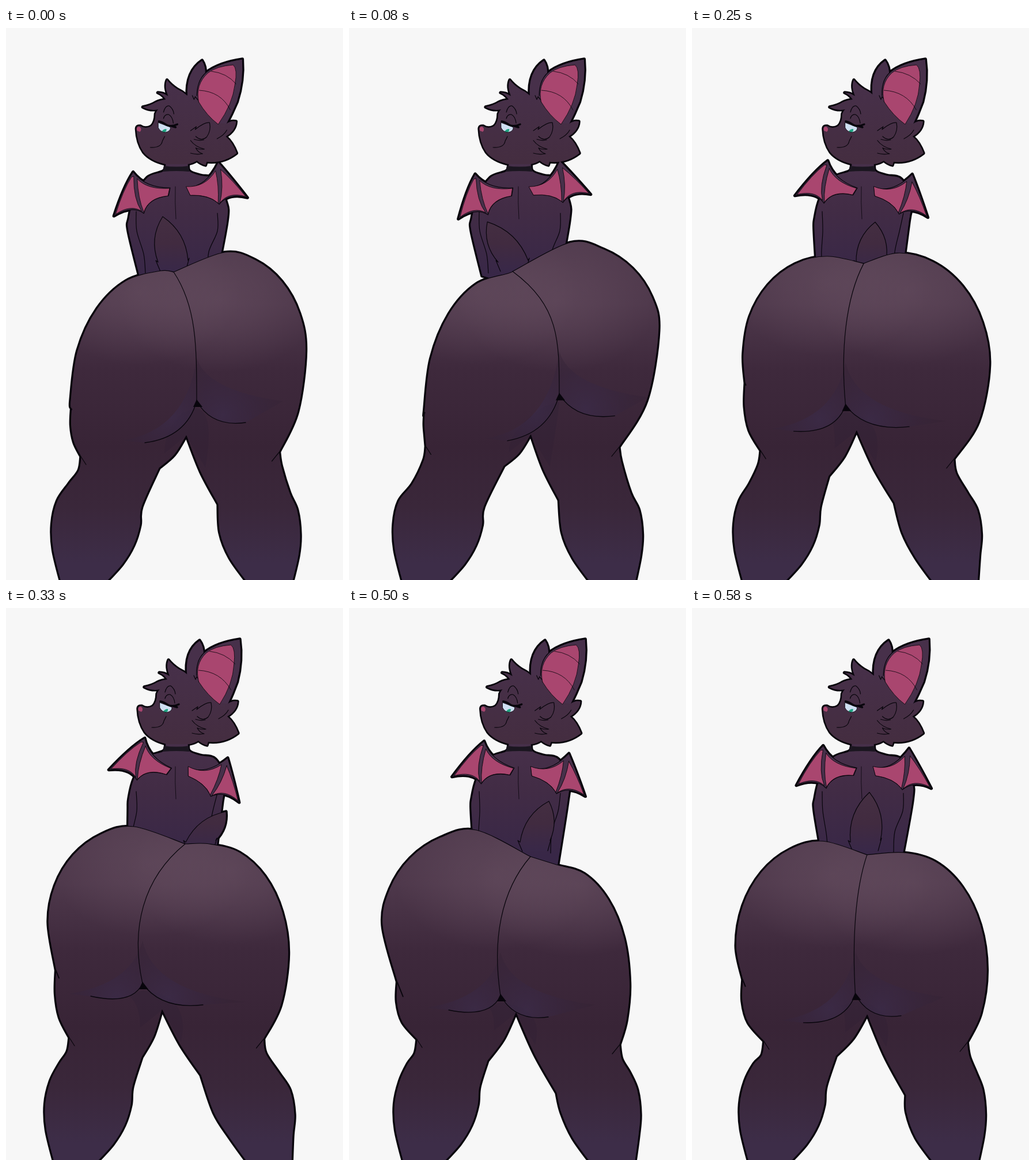
Animation, 585 px wide and 957 px high, one loop 660 ms. Source, as an HTML page with a canvas:

```html
<!DOCTYPE html>
<html lang="en">
<head>
<meta charset="utf-8">
<title>Bat sway</title>
<style>
html, body { margin: 0; width: 100%; height: 100%; overflow: hidden; background: #f7f7f7; }
canvas { display: block; }
</style>
</head>
<body>
<canvas id="stage" width="585" height="957"></canvas>
<script>
const ctx = document.getElementById('stage').getContext('2d');
const INK = '#08050c', FUR = '#47304a', PINK = '#a9466f';
const LOOP = 660, STARTS = [0, 80, 160, 250, 330, 410, 500, 580];

// Every moving part swings on a short sum of waves of the loop angle.
function poseAt(angle) {
  const wave = (mean, cos = 0, sin = 0, cos2 = 0, sin2 = 0, cos4 = 0) =>
    mean + cos * Math.cos(angle) + sin * Math.sin(angle) + cos2 * Math.cos(2 * angle)
    + sin2 * Math.sin(2 * angle) + cos4 * Math.cos(4 * angle);
  const cleft = [wave(301, -10, -14), wave(420, 7, -7, -4, 2)];
  const gap = [wave(291, 47, 35, -7, 16), wave(654, -2, -13, -5, -8)];
  const tailX = wave(284, -24, -17, 4, 4), underY = gap[1] + wave(47, 25, 22);
  return {
    cleft, gap,
    headShift: wave(1.7, -1.3, -1), earLean: wave(-3.5, 3.5, -1),
    wingTilt: wave(12, -12.5, -6, 0, -2.5),
    armEnd: wave(221, 10, 4), armRight: wave(380, 4),
    tail: [[tailX, 406], [wave(313, -55, -48, 14), wave(337, -13, -1, 3, 9)], [tailX + 52, 403]],
    topL: [Math.min(wave(247, 23, 28, -2, 16), cleft[0] - 8), wave(400, 21, 15)],
    sideL: [wave(89.5, 19.5, 28.5, 3, 7), wave(590, 50, 35, 5, 15)],
    thighL: [wave(100, 13.5, 16.5, 0, 10), wave(644, 16, -4, 0, 14)],
    topR: [wave(366, 13, 6, 0, 4), wave(405, -10, -34, -6, -2)],
    sideR: [wave(510, 15, 18, 0, 0, -4.5), wave(590, -20, -50, -10, -16)],
    kneeL: [wave(122, 10, 6, -2), wave(739, -1, -14, 5, -3)],
    kneeR: [wave(464, 13.5, -3, -3, -2.5), wave(744, -6, -10, -3, -6)],
    innerL: [wave(249, 15, 6, 2, 5), wave(774, -8, -8, -3, -3)],
    innerR: [wave(357, 15, 1, -4, -4), wave(826, 8, -7, -8, -8)],
    crotch: [wave(295, 21, 8, -3), wave(702, 5)],
    calfL: wave(75.5, 6, -1, -2, -2), calfR: wave(506, 5), calfInner: wave(228, 8, 1),
    folds: [
      { dir: -1, bend: .2, end: [gap[0] - 90, underY], tip: [gap[0] - 128, underY - 4] },
      { dir: 1, bend: .31, end: [gap[0] + wave(95, -10, 12), gap[1] + 37],
        tip: [gap[0] + wave(165, -15), gap[1] + wave(16, -16)] }
    ]
  };
}
const poses = STARTS.map((_, i) => poseAt(i * Math.PI / 4));

const mix = (a, b, t) => a + (b - a) * t;

// Appends a smooth curve through the points.
function spline(path, pts, start) {
  if (start) path.moveTo(...pts[0]); else path.lineTo(...pts[0]);
  for (let i = 0; i < pts.length - 1; i++) {
    const a = pts[i - 1] || pts[i], b = pts[i], c = pts[i + 1], d = pts[i + 2] || c;
    path.bezierCurveTo(b[0] + (c[0] - a[0]) / 6, b[1] + (c[1] - a[1]) / 6,
      c[0] - (d[0] - b[0]) / 6, c[1] - (d[1] - b[1]) / 6, c[0], c[1]);
  }
  return path;
}
const curve = pts => spline(new Path2D(), pts, true);

// Points of a quarter ellipse from its top to its side.
const quarter = (top, side) => [0, 1, 2, 3, 4].map(i => {
  const a = i * Math.PI / 8;
  return [mix(top[0], side[0], Math.sin(a)), mix(side[1], top[1], Math.cos(a))];
});

function bulge(path, a, b, k) {
  path.quadraticCurveTo((a[0] + b[0]) / 2 + (b[1] - a[1]) * k, (a[1] + b[1]) / 2 - (b[0] - a[0]) * k, ...b);
}

function withStops(g, stops) {
  for (const [at, color] of stops) g.addColorStop(at, color);
  return g;
}
const vertical = (y0, y1, stops) => withStops(ctx.createLinearGradient(0, y0, 0, y1), stops);

function line(path, width = 1.2, color = INK) {
  ctx.lineWidth = width;
  ctx.strokeStyle = color;
  ctx.stroke(path);
}
function fill(path, color) { ctx.fillStyle = color; ctx.fill(path); }

const headShape = new Path2D(`M226 175Q226 169 233 170Q242 176 252 170Q259 163 259 149Q262 142 264 141
  Q250 144 237 137Q251 134 259 129Q267 125 277 124Q272 116 263 112Q272 112 281 118Q274 101 279 90
  Q286 99 297 106Q306 110 314 117L334 118L368 164L382 166Q390 160 399 162Q398 178 381 188
  Q393 198 400 217Q377 235 348 232L346 238Q338 236 331 230Q323 235 315 236L276 236Q250 230 238 215Q227 199 226 175Z`);
const backEar = new Path2D('M314 120Q311 75 340 56Q347 66 346 82L340 124Z');
const bigEar = new Path2D('M331 126Q329 92 347 77Q369 60 410 54Q413 91 401 128Q392 149 382 168L366 182Z');
const innerEar = new Path2D('M334 128Q328 98 350 78Q365 66 394 64Q402 71 397 98Q393 132 368 167Q348 152 334 128Z');
const earFolds = new Path2D('M356 75Q383 78 399 97M335 108Q373 110 389 142');
const headLines = new Path2D(`M320 178L330 171L328 176Q344 163 353 164Q356 178 348 189Q339 197 329 188
  M326 193Q335 196 343 194M320 195Q328 206 344 210Q335 211 329 208Q333 216 341 218Q330 220 320 217
  M273 146Q276 134 283 135Q290 140 291 149M273 157Q275 149 282 150Q289 154 290 165
  M250 207Q269 208 271 196L275 188M323 117L326 124L328 119L333 125M366 192Q378 186 383 177`);
const eye = new Path2D('M264 164L285 172Q286 179 276 181Q267 180 264 173Z');
const iris = new Path2D('M270 180Q272 175 278 175Q279 179 275 181Z');
const lashes = new Path2D('M265 162Q271 163 278 168Q286 172 297 167M287 170L294 172');

const wingL = {
  root: [285, 283],
  outline: new Path2D('M285 277Q242 277 221 249Q204 274 187 325Q219 306 239 321Q245 295 282 291Z'),
  panels: new Path2D('M218 258Q203 281 190 322Q216 305 235 317Q221 296 222 257ZM228 261Q245 280 284 278L281 291Q247 294 239 319Q229 295 228 261Z')
};
const wingR = {
  root: [315, 283],
  outline: new Path2D('M314 276Q347 277 369 233Q390 257 419 295Q387 286 370 306Q353 289 320 290Z'),
  panels: new Path2D('M313 275Q346 277 364 248Q370 273 368 304Q352 289 320 290ZM373 246Q394 265 416 293Q386 284 371 304Q378 277 373 246Z')
};

function onWings(p, draw) {
  for (const wing of [wingL, wingR]) {
    const [x, y] = wing.root;
    ctx.save();
    ctx.translate(x, y);
    ctx.rotate(p.wingTilt * Math.PI / 180);
    ctx.translate(-x, -y);
    draw(wing);
    ctx.restore();
  }
}

// Runs a drawing with the head's shift and, for ears, a lean about their base.
function onHead(p, lean, draw) {
  ctx.save();
  ctx.translate(p.headShift, 0);
  if (lean) {
    const k = p.earLean / 113;
    ctx.transform(1, 0, -k, 1, 167 * k, 0);
  }
  draw();
  ctx.restore();
}

function torsoPath(p) {
  const path = curve([[276, 228], [274, 247], [245, 259], [222, 295], [213, 330], [212, 352], [p.armEnd, 430]]);
  path.lineTo(300, 450);
  return spline(path, [[362, 450], [p.armRight, 335], [382, 300], [364, 262], [337, 255], [318, 247], [317, 228]]);
}

function tailPath({ tail: [a, tip, b] }) {
  const path = new Path2D();
  path.moveTo(a[0] + 4, a[1] + 16);
  path.lineTo(a[0] - 4, a[1] - 3);
  path.lineTo(...a);
  bulge(path, a, tip, .25);
  bulge(path, tip, b, .24);
  path.lineTo(b[0] + 2, b[1] - 4);
  path.lineTo(b[0] - 4, b[1] + 18);
  return path;
}

function bodyPath({ cleft, topL, sideL, thighL, topR, sideR, kneeL, kneeR, innerL, innerR, crotch, calfL, calfR, calfInner: m }) {
  const fromKnee = (knee, outer, t, y) => [mix(knee[0], outer, t), y];
  const between = (a, b, dx, dy) => [(a[0] + b[0]) / 2 + dx, (a[1] + b[1]) / 2 + dy];
  const path = curve([[calfL + 17, 966], [calfL + 2, 905], [calfL, 860], [calfL + 9, 820],
    fromKnee(kneeL, calfL, .42, 790), [kneeL[0] - 4, kneeL[1] + 24], kneeL]);
  spline(path, [kneeL, [mix(thighL[0], kneeL[0], .25), mix(thighL[1], kneeL[1], .7)],
    [thighL[0] - 1, mix(thighL[1], kneeL[1], .35)], thighL]);
  spline(path, [thighL, ...quarter(topL, sideL).reverse(), cleft]);
  spline(path, [cleft, ...quarter(topR, sideR),
    [mix(sideR[0], kneeR[0], .3), mix(sideR[1], kneeR[1], .6)], kneeR]);
  spline(path, [kneeR, [kneeR[0] + 4, kneeR[1] + 25], fromKnee(kneeR, calfR, .5, 806),
    fromKnee(kneeR, calfR, .86, 836), [calfR, 878], [calfR - 3, 915], [496, 966]]);
  spline(path, [[422, 966], [388, 919], [innerR[0] * .35 + 242, 875], innerR]);
  spline(path, [innerR, between(innerR, crotch, -3, 3), crotch]);
  spline(path, [crotch, between(crotch, innerL, 3, 5), innerL]);
  spline(path, [innerL, [m, 830], [m - 3, 862], [m - 14, 897], [m - 34, 930], [m - 67, 966]]);
  path.closePath();
  return path;
}

function glow(x, y) {
  ctx.save();
  ctx.translate(x, y);
  ctx.scale(1, .72);
  ctx.fillStyle = withStops(ctx.createRadialGradient(0, 0, 0, 0, 0, 175),
    [[0, 'rgba(104,80,98,.5)'], [.4, 'rgba(104,80,98,.34)'], [1, 'rgba(104,80,98,0)']]);
  ctx.fillRect(-175, -175, 350, 350);
  ctx.restore();
}

function drawFold([gx, gy], { dir, bend, end, tip }) {
  const control = [mix(gx, end[0], bend), end[1] + 27 - (end[1] - gy) / 2];
  const crescent = new Path2D();
  crescent.moveTo(gx, gy - 75);
  crescent.quadraticCurveTo(gx + dir * 18, tip[1] - 18, ...tip);
  crescent.lineTo(...end);
  crescent.quadraticCurveTo(...control, gx, gy);
  const x = gx + dir * 45, y = gy + 25;
  fill(crescent, withStops(ctx.createRadialGradient(x, y, 0, x, y, 115),
    [[0, 'rgba(59,43,73,.75)'], [.4, 'rgba(56,39,65,.6)'], [1, 'rgba(50,33,50,.35)']]));
  const crease = new Path2D();
  crease.moveTo(gx, gy);
  crease.quadraticCurveTo(...control, ...end);
  line(crease, 1.3);
}

function drawBody(p, body) {
  const [topX, topY] = p.cleft, [gx, gy] = p.gap, [cx, cy] = p.crotch;
  fill(body, vertical(380, 957, [[0, '#503a4d'], [.17, '#4e384b'], [.37, '#3e293c'],
    [.6, '#382436'], [.78, '#3a273a'], [.95, '#3d2d48'], [1, '#3d2d48']]));
  ctx.save();
  ctx.clip(body);
  glow(topX - 60, topY + 35);
  glow(topX + 80, topY + 48);

  const shade = new Path2D();
  shade.moveTo(gx, gy + 12);
  shade.quadraticCurveTo(cx + 50, gy + 20, cx + 33, cy + 55);
  shade.lineTo(cx, cy);
  shade.lineTo(cx - 38, cy + 30);
  shade.quadraticCurveTo(cx - 38, cy - 10, gx - 25, gy + 20);
  fill(shade, 'rgba(48,32,54,.35)');
  p.folds.forEach(fold => drawFold(p.gap, fold));
  ctx.restore();

  line(body);
  const lean = gx - topX, cleft = new Path2D();
  cleft.moveTo(topX, topY);
  cleft.bezierCurveTo(gx, topY + 60, gx + Math.min(0, lean) * .28, gy - 95, gx, gy);
  line(cleft);
  fill(new Path2D(`M${gx} ${gy - 3}L${gx + 10} ${gy + 10}L${gx - 6} ${gy + 10}Z`), INK);
  line(new Path2D(`M${p.kneeL}l9 14M${p.kneeR}l-13 16`));
  const tuck = Math.max(0, p.thighL[0] - p.sideL[0]);
  line(new Path2D(`M${p.thighL}l${tuck * .4} ${tuck}`), 2);
}

function drawTorso(p, torso) {
  fill(torso, vertical(235, 430, [[0, FUR], [.4, '#422c45'], [1, '#382747']]));
  line(torso);
  line(curve([[226, 318], [227, 352], [p.armEnd + 8, 392], [p.armEnd + 11, 425]]));
  line(curve([[367, 321], [p.armRight - 17, 352], [352, 388], [350, 425]]));
  line(new Path2D('M294 275Q293 302 295 331'), .8);
  fill(new Path2D('M274 239Q296 242 317 239L318 249Q296 247 272 249Z'), '#1b1620');
}

function drawHead(p) {
  onHead(p, true, () => {
    for (const ear of [backEar, bigEar]) {
      fill(ear, FUR);
      line(ear);
    }
  });
  onHead(p, false, () => {
    fill(headShape, vertical(90, 235, [[0, FUR], [1, '#442d40']]));
    line(headLines);
    fill(new Path2D('M227 178Q225 171 231 171Q237 175 232 180Z'), PINK);
    fill(eye, '#cfdff2');
    fill(iris, '#23a482');
    line(eye, .8);
    line(lashes, 3.4);
  });
  onHead(p, true, () => {
    fill(innerEar, PINK);
    line(innerEar, .8);
    line(earFolds, .8);
  });
}

function draw(p) {
  const torso = torsoPath(p), tail = tailPath(p), body = bodyPath(p);
  const bold = path => line(path, 5.4);
  ctx.fillStyle = '#f7f7f7';
  ctx.fillRect(0, 0, 585, 957);
  ctx.lineJoin = ctx.lineCap = 'round';

  // Heavy contour first, so only its outer half survives the fills.
  [torso, tail, body].forEach(bold);
  onWings(p, wing => bold(wing.outline));
  onHead(p, true, () => [backEar, bigEar].forEach(bold));
  onHead(p, false, () => bold(headShape));

  drawTorso(p, torso);
  fill(tail, vertical(325, 420, [[0, '#452f42'], [.5, '#412b40'], [1, '#392848']]));
  line(tail);
  onWings(p, wing => {
    fill(wing.outline, FUR);
    line(wing.outline);
    fill(wing.panels, PINK);
    line(wing.panels, .8);
  });
  drawHead(p);
  drawBody(p, body);
}

function tick() {
  const t = performance.now() % LOOP;
  draw(poses[STARTS.findLastIndex(start => t >= start)]);
  requestAnimationFrame(tick);
}
tick();
</script>
</body>
</html>
```
